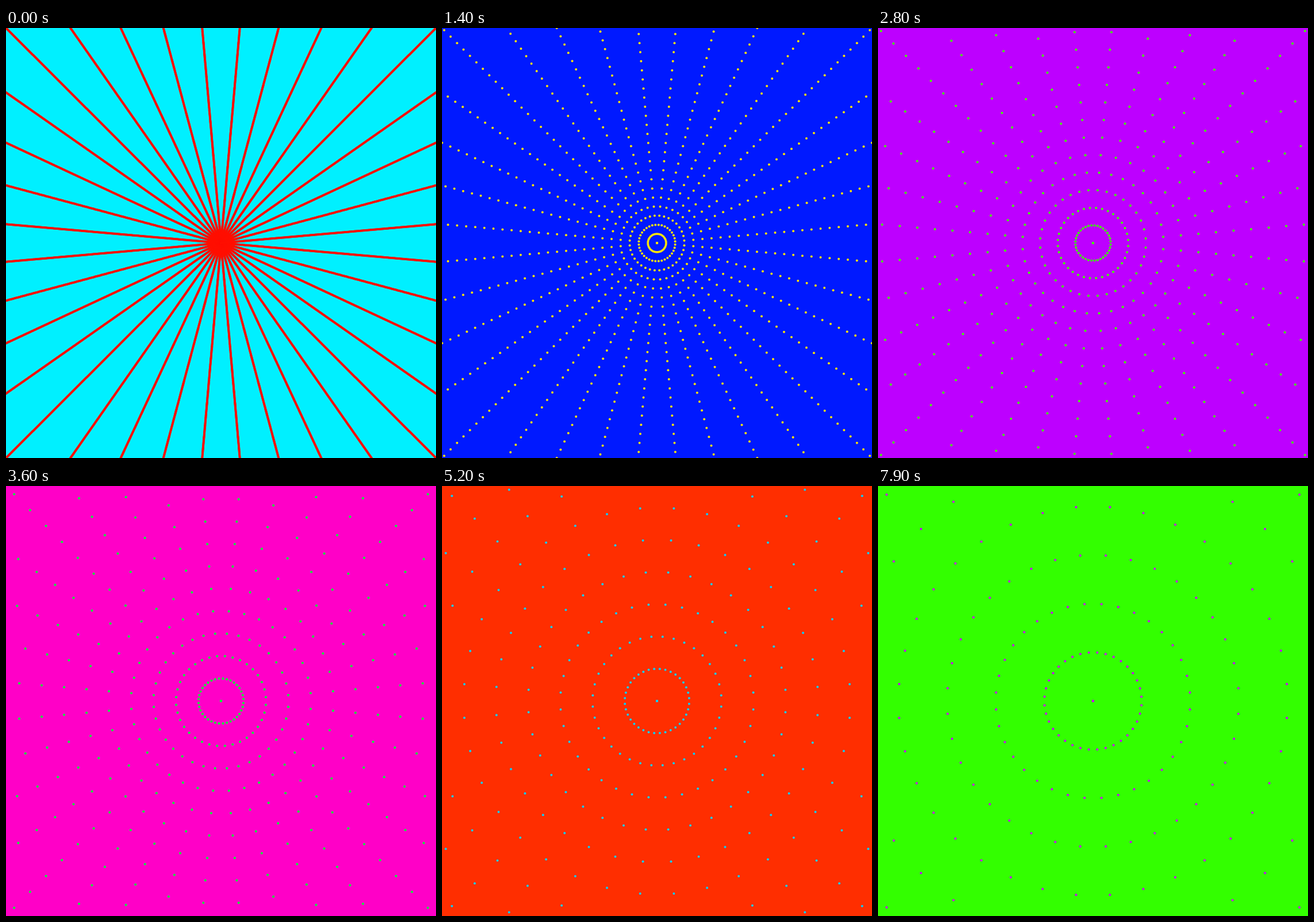
An HTML page with a canvas for the animation above (8 s loop, 748x748 px).

```html
<!DOCTYPE html>
<html lang="en">
<head>
<meta charset="utf-8">
<title>Expanding rays</title>
<style>
  html, body { margin: 0; width: 100%; height: 100%; overflow: hidden; }
  canvas { display: block; width: 748px; height: 748px; }
</style>
</head>
<body>
<canvas id="stage" width="748" height="748"></canvas>
<script>
const SIZE = 748, MID = SIZE / 2, REACH = MID * Math.SQRT2;
const RAYS = 36, DOT = 2;
const LOOP = 8000, STEP = 100;
const ctx = document.getElementById('stage').getContext('2d');

function dot(x, y) {
  ctx.beginPath();
  ctx.arc(x, y, DOT, 0, Math.PI * 2);
  ctx.fill();
}

const onStage = v => v > -DOT && v < SIZE + DOT;

function draw(step) {
  const n = step + 1;
  const hue = n * 3.6;
  const gap = n * REACH / 500;

  ctx.fillStyle = `hsl(${(hue + 180) % 360}, 100%, 50%)`;
  ctx.fillRect(0, 0, SIZE, SIZE);

  // Dots are filled one by one so that close ones merge into solid rays.
  ctx.fillStyle = `hsl(${hue % 360}, 100%, 50%)`;
  for (let i = 0; i < RAYS; i++) {
    const angle = (i + 0.5) * 2 * Math.PI / RAYS;
    const dx = Math.cos(angle), dy = Math.sin(angle);
    for (let r = 0; r < REACH + DOT; r += gap) {
      const x = MID + r * dx, y = MID + r * dy;
      if (!onStage(x) || !onStage(y)) break;
      dot(x, y);
    }
  }
}

const start = performance.now();
let shown = -1;

function tick() {
  const time = Math.max(0, performance.now() - start) % LOOP;
  const step = Math.floor(time / STEP);
  if (step !== shown) draw(shown = step);
  requestAnimationFrame(tick);
}
tick();
</script>
</body>
</html>
```
